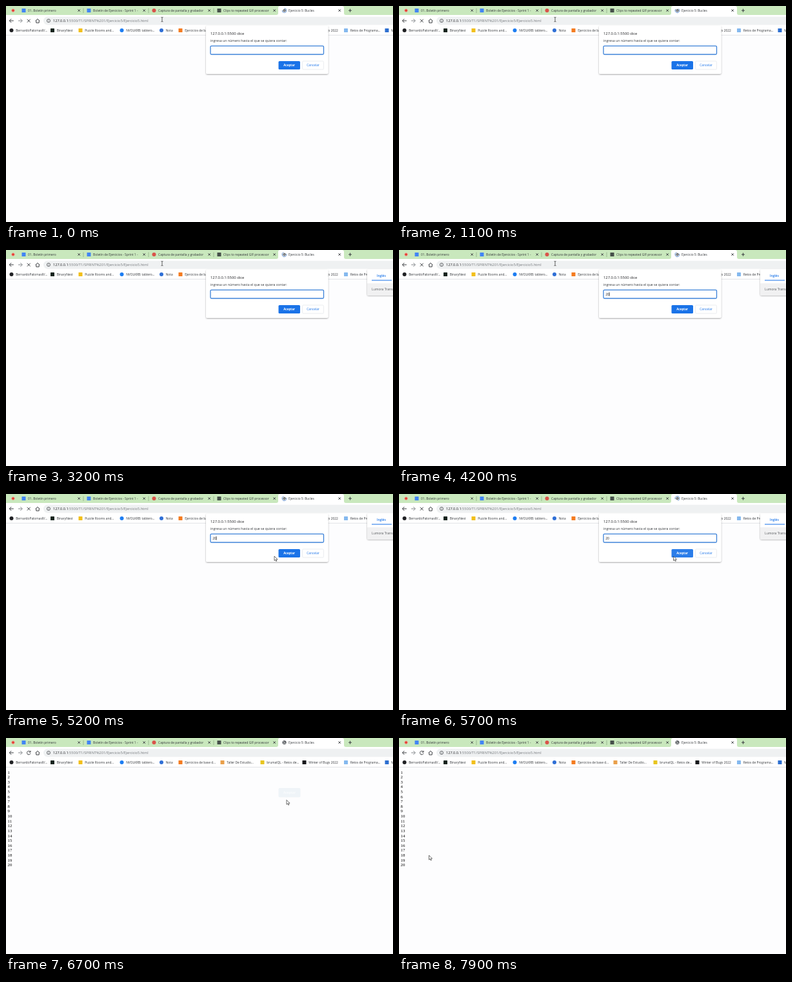
Write an HTML page that moves like this. It is 600 px wide and 337 px high and loops after 8000 ms.

```html
<!DOCTYPE html>
<html lang="es">
<head>
<meta charset="utf-8">
<style>
html, body { margin: 0; width: 100%; height: 100%; overflow: hidden; background: #fdfdfe; }
svg { display: block; width: 600px; height: 337px; font: 4.85px "Open Sans", "Noto Sans", sans-serif; fill: #33363a; }
text { white-space: pre; }
.line { fill: none; stroke: #3a3d41; stroke-width: 1; }
.serif { font: 6.7px "Liberation Serif", serif; fill: #000; }
</style>
</head>
<body>
<svg viewBox="0 0 600 337">
  <defs>
    <filter id="shadow" x="-10%" y="-10%" width="120%" height="130%">
      <feDropShadow dx="0" dy="1" stdDeviation="1.2" flood-opacity=".34"/>
    </filter>
  </defs>
  <rect width="600" height="14" fill="#c9e8bd"/>
  <rect y="14" width="600" height="31" fill="#fff"/>
  <path d="M419 14q3 0 3-3V3q0-3 3-3H521q3 0 3 3V11q0 3 3 3z" fill="#fff"/>
  <rect y="45" width="600" height=".8" fill="#dcdfe2"/>
  <rect x="58" y="16.800" width="560" height="12.600" rx="6.300" fill="#eff1f2"/>
  <g id="tabs"></g>
  <g class="line">
    <path d="M11.800 23H5.300m3-3L5.300 23l3 3M45.800 23.200l3.200-3 3.200 3M46.800 22.800v3.400h4.400v-3.400"/>
    <path d="M19 23h6.300m-3-3L25.300 23l-3 3" stroke="#84888c"/>
    <path id="stop" d="M32.900 20.700l4.800 4.800m0-4.800l-4.800 4.800"/>
    <path id="reload" d="M37.600 21.500a2.800 2.800 0 1 0 .4 2.400M38 19.800v2.300h-2.400"/>
    <circle cx="66" cy="23" r="2.600" stroke-width=".7"/>
    <path d="M66 22.700v1.800m0-3v.6" stroke-width=".7"/>
    <path d="M533.500 4.500v5m-2.500-2.500h5"/>
  </g>
  <text x="73" y="25" font-size="5.58" fill="#74787c"><tspan fill="#202124">127.0.0.1</tspan>:5500/T1/SPRINT%201/Ejercicio5/Ejercicio5.html</text>
  <g fill="none" stroke="#54585c" stroke-width=".7">
    <g id="globe">
      <circle r="2.500" fill="#54585c"/>
      <path d="M-1.900-.8Q0-1.800.4 0T1.800 1M-1.600 1.200L0 1.600" stroke="#fff"/>
    </g>
    <path id="spinner" d="M0-3.400A3.400 3.400 0 1 1-3.400 0" stroke="#3d77c9"/>
  </g>
  <g id="marks"></g>
  <g id="list" class="serif"></g>
  <g id="popup">
    <rect x="560" y="30" width="50" height="40.500" rx="2" fill="#fff" filter="url(#shadow)"/>
    <path d="M560 52h40v18.500H562q-2 0-2-2z" fill="#f1f1f2"/>
    <text x="575" y="42.300" font-weight="600" fill="#1a73e8">Inglés</text>
    <path d="M567 47.200h31" stroke="#1a73e8"/>
    <text x="567" y="62.500" font-size="5.1" fill="#55585c">Lumora Translate</text>
  </g>
  <g id="dialog">
    <rect x="310" y="30.500" width="189.500" height="75.500" rx="2.500" fill="#fff" filter="url(#shadow)"/>
    <text x="317" y="44.500" font-size="5.85" fill="#202124">127.0.0.1:5500 dice</text>
    <text x="317" y="56.400" font-size="5.19">ingresa un número hasta el que se quiera contar:</text>
    <rect x="317" y="62.300" width="175.500" height="13.200" rx="1.500" fill="#fff" stroke="#3a80d8" stroke-width="1.300"/>
    <text id="value" x="320.200" y="70.800" font-size="5.1" fill="#202124"></text>
    <path id="caret" d="M0 66v6" stroke="#111" stroke-width=".7"/>
    <rect id="accept" x="422.500" y="86" width="33.500" height="13" rx="1.600"/>
    <text x="439.200" y="94.200" font-size="4.6" font-weight="700" fill="#fff" text-anchor="middle">Aceptar</text>
    <rect x="459.500" y="86" width="33" height="13" rx="1.600" fill="#fff" stroke="#e3e6ea" stroke-width=".7"/>
    <text x="476" y="94.200" fill="#1a73e8" text-anchor="middle">Cancelar</text>
  </g>
  <g id="ghost">
    <rect x="422.500" y="78" width="34" height="14.500" rx="2" fill="#eff4f8"/>
    <text x="439.500" y="87" font-weight="700" fill="#fafcfd" text-anchor="middle">Aceptar</text>
  </g>
  <path id="beam" d="M-1.500-3.500Q0-3.500 0-2.700V2.700Q0 3.500 1.500 3.500M1.500-3.500Q0-3.500 0-2.700M0 2.700Q0 3.500-1.500 3.500" fill="none" stroke="#222" stroke-width=".7"/>
  <path id="arrow" d="M0 0V7L1.600 5.500 2.700 8 3.900 7.500 2.800 5.100H5z" fill="#fff" stroke="#222" stroke-width=".65"/>
</svg>
<script>
const $ = id => document.getElementById(id);
const show = (id, on) => $(id).style.display = on ? '' : 'none';
const place = (id, x, y, extra = '') => $(id).setAttribute('transform', `translate(${x} ${y}) ${extra}`);
const label = (x, y, s) => `<text x="${x}" y="${y}">${s}</text>`;
const square = (x, y, color) => `<rect x="${x - 3}" y="${y - 3}" width="6" height="6" rx=".6" fill="${color}"/>`;
const dot = (x, y, color) => `<circle cx="${x}" cy="${y}" r="3" fill="${color}"/>`;

const tabs = [
  [27.5, square, '#4285f4', '01. Boletín primero'],
  [128.5, square, '#4285f4', 'Boletín de Ejercicios - Sprint 1 -'],
  [229.5, dot, '#d9534a', 'Captura de pantalla y grabador'],
  [330.5, square, '#46504a', 'Clips to repeated GIF processor'],
  [431.5, null, '', 'Ejercicio 5: Bucles']
];
$('tabs').innerHTML = '<circle cx="11" cy="7" r="2.3" fill="#e5392f" stroke="#eba694"/>' +
  tabs.map(([x, icon, color, name], i) =>
    (icon ? icon(x, 7, color) : '') + label(x + 6.6, 8.5, name) +
    `<path class="line" d="M${x + 84} 5.300l3.400 3.400m0-3.400l-3.400 3.400"/>` +
    (i < 3 ? `<path d="M${x + 92.5} 3.500v7.500" stroke="#86a47c" stroke-width=".7"/>` : '')).join('');

const marks = [
  [8.5, dot, '#202124', 'BernardoPalomasR/...'],
  [72, square, '#14241c', 'BinaryNest'],
  [115.5, square, '#f2bf1b', 'Puzzle Rooms and...'],
  [179.5, dot, '#1d7df2', 'NVOLKRB: tablero...'],
  [241, dot, '#2f6fd6', 'Nota'],
  [270.5, square, '#f47b20', 'Ejercicios de base d...'],
  [335.5, square, '#e9a04b', 'Taller De Estudio...'],
  [397.5, square, '#e8c51f', 'brumalQL - Retos de...'],
  [462.5, square, '#17181c', 'Winter of Bugs 2022'],
  [527, square, '#85b9ee', 'Retos de Programa...'],
  [590.5, square, '#2d6fd0', 'M']
];
$('marks').innerHTML = marks.map(([x, icon, color, name]) =>
  icon(x, 38, color) + label(x + 6.7, 39.7, name)).join('');
$('list').innerHTML = Array.from({length: 20}, (_, i) => label(2.6, 55.6 + i * 7.61, i + 1)).join('');

// time, x, y of the pointer
const path = [
  [4600, 242, 21], [5000, 416, 97], [5500, 416, 97], [5900, 435, 97],
  [7200, 435, 96.5], [7600, 62, 203], [7850, 46.5, 183]
];
const clamp = v => Math.max(0, Math.min(1, v));
function pointer(t) {
  let [, x, y] = path[0];
  for (let i = 1; i < path.length; i++) {
    const [t0, x0, y0] = path[i - 1], [t1, x1, y1] = path[i];
    if (t < t0) break;
    const p = clamp((t - t0) / (t1 - t0)), e = p * p * (3 - 2 * p);
    x = x0 + (x1 - x0) * e;
    y = y0 + (y1 - y0) * e;
  }
  return [x, y];
}

function draw(t) {
  const done = t >= 6600;
  const [x, y] = pointer(t);
  show('beam', y < 30);
  show('arrow', y >= 30);
  place('beam', x, y);
  place('arrow', x, y);

  show('stop', !done);
  show('reload', done);
  show('list', done);
  show('dialog', !done);
  show('ghost', done && t < 7200);
  show('spinner', !done);
  show('popup', t >= 3000 && !done);
  place('globe', 431.5, 7, `scale(${done ? 1.1 : .8})`);
  place('spinner', 431.5, 7, `rotate(${t * .36})`);

  const typed = t < 3550 ? 0 : t < 3850 ? 1 : 2;
  $('value').textContent = '20'.slice(0, typed);
  place('caret', 320.2 + typed * 2.92, 0);
  show('caret', (t % 1000 < 500) === typed > 0);
  $('accept').setAttribute('fill', x > 422 && y > 86 ? '#2b7de9' : '#1a73e8');
}

function loop() {
  draw(performance.now() % 8000);
  requestAnimationFrame(loop);
}
loop();
</script>
</body>
</html>
```
